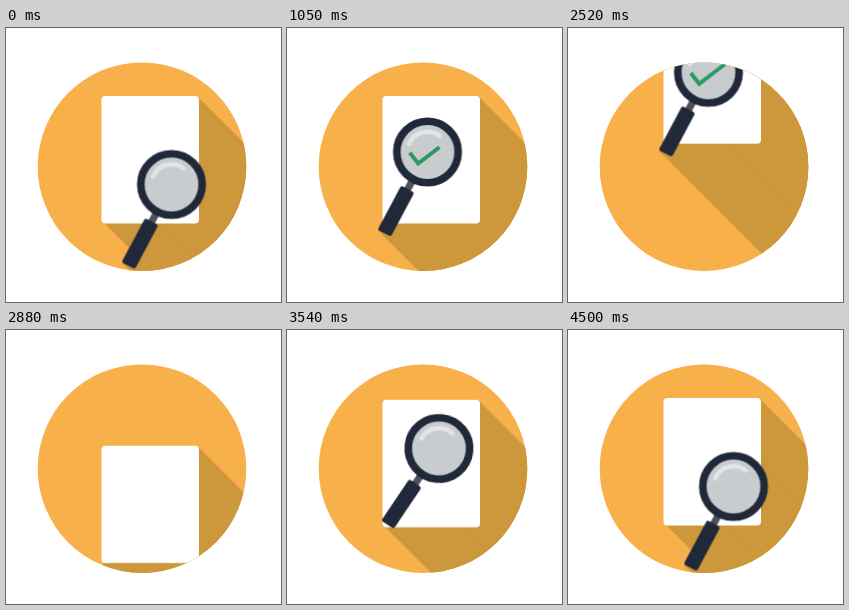
Recreate the animation shown at these times as an HTML page without scripts. Size 275 by 274 pixels, loop 4.53 s.

```html
<!DOCTYPE html>
<html lang="en">
<head>
<meta charset="utf-8">
<title>Document review</title>
<style>
  html, body { margin: 0; width: 100%; height: 100%; overflow: hidden; background: #fff; }
  svg { display: block; width: 100vw; height: 100vh; }

  .leave, .page, .paper, .glass, .tilt, .check {
    animation: 4530ms linear infinite;
  }
  .leave { animation-name: leave; }
  .page  { animation-name: page; }
  .paper { animation-name: paper; transform-origin: 0 68px; }
  .glass { animation-name: glass; }
  .tilt  { animation-name: tilt; }
  .check { animation-name: check; stroke-dasharray: 1 2; }

  .shade { fill: #cd973b; stroke: none; }
  .dark  { fill: #202939; }

  /* Everything slides out at the top, then re-enters from below. */
  @keyframes leave {
    0%, 49.67% { transform: none; animation-timing-function: cubic-bezier(.6, 0, .8, .5); }
    58.94% { transform: translateY(-260px); }
    58.95%, 100% { transform: none; }
  }
  @keyframes page {
    0%, 58.94% { transform: translateY(0); }
    58.95% { transform: translateY(180px); animation-timing-function: cubic-bezier(.3, .4, .6, .85); }
    63.58% { transform: translateY(48px); animation-timing-function: cubic-bezier(.2, .7, .4, 1); }
    78.15% { transform: translateY(1.8px); }
    82%, 100% { transform: translateY(0); }
  }
  @keyframes paper {
    0%, 58.94% { transform: none; }
    58.95% { transform: scaleY(.72); }
    63.58% { transform: scaleY(.92); animation-timing-function: ease-out; }
    74%, 100% { transform: none; }
  }
  @keyframes glass {
    0%, 1% { transform: translate(165.5px, 156.5px); animation-timing-function: ease-in-out; }
    17.2%, 58.94% { transform: translate(140.5px, 124px); }
    58.95%, 68.5% { transform: translate(205px, 300px); animation-timing-function: cubic-bezier(.2, .5, .6, .92); }
    78.15% { transform: translate(152px, 118.5px); animation-timing-function: cubic-bezier(.3, .5, .5, 1); }
    87.4%, 88.8% { transform: translate(129.5px, 105.5px); animation-timing-function: ease-in-out; }
    99.3%, 100% { transform: translate(165.5px, 156.5px); }
  }
  @keyframes tilt {
    0%, 58.94% { transform: none; }
    58.95%, 68.5% { transform: rotate(25deg); animation-timing-function: ease-out; }
    78.15% { transform: rotate(6deg); animation-timing-function: ease-out; }
    87.4%, 100% { transform: rotate(0deg); }
  }
  @keyframes check {
    0%, 18.1% { stroke-dashoffset: 1.02; }
    24.06%, 58.94% { stroke-dashoffset: 0; }
    58.95%, 100% { stroke-dashoffset: 1.02; }
  }
</style>
</head>
<body>
<svg viewBox="0 0 275 274" preserveAspectRatio="none">
  <defs>
    <clipPath id="disc"><circle cx="136" cy="138.7" r="104.3"/></clipPath>
  </defs>
  <circle cx="136" cy="138.7" r="104.3" fill="#f8b04a"/>
  <g clip-path="url(#disc)">
    <g class="leave">
      <!-- long shadows -->
      <g class="page">
        <path class="shade" d="M97 194V70L192 69l300 300L397 494z"/>
      </g>
      <g class="glass">
        <path class="shade" d="M-50 78L-28 34L-14 41l300 300L250 378z"/>
        <path d="M0 0L300 300" stroke="#cd973b" stroke-width="69" stroke-linecap="round"/>
      </g>

      <g class="page">
        <rect class="paper" x="95.5" y="68" width="97.5" height="127.5" rx="4" fill="#fff"/>
      </g>

      <g class="glass">
        <g class="tilt">
          <g transform="rotate(28)">
            <rect x="-3.5" y="32" width="7" height="13" fill="#4b505b"/>
            <rect class="dark" x="-7.5" y="42" width="15" height="50" rx="2.5"/>
          </g>
          <circle r="30.7" fill="#c8cccf" stroke="#202939" stroke-width="7.6"/>
          <path d="M-18.5 -8A20.2 20.2 0 0 1 12 -16.2" fill="none" stroke="#e1e5e7" stroke-width="4.6" stroke-linecap="round"/>
        </g>
      </g>

      <path class="check" pathLength="1" d="M122.8 124.8L131.2 135.5L158 115" fill="none" stroke="#2b9b66" stroke-width="4"/>
    </g>
  </g>
</svg>
</body>
</html>
```
